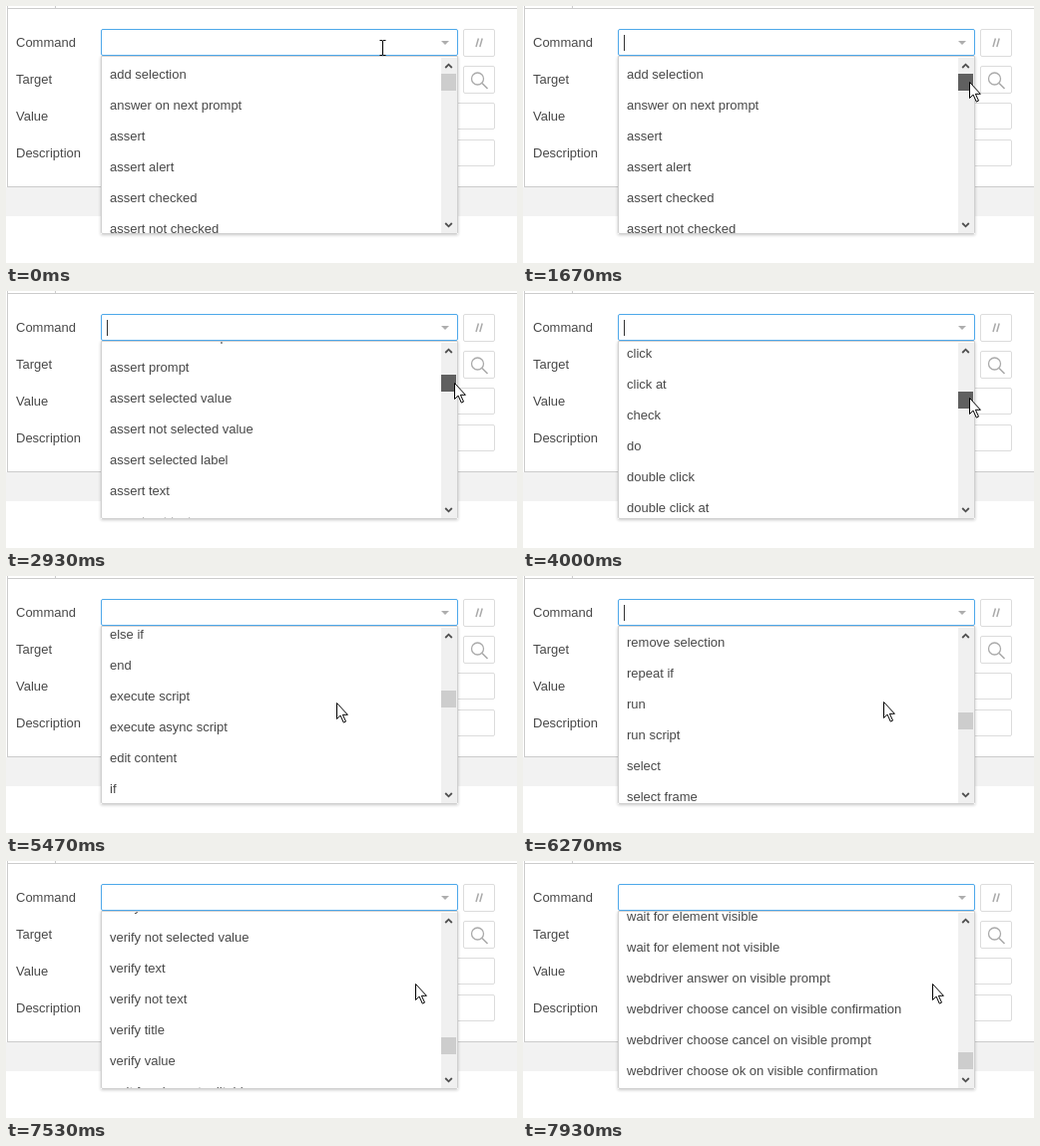
These frames come from a looping animation (512x258 px, 8000 ms). An HTML page:

```html
<!DOCTYPE html>
<html lang="en">
<head>
<meta charset="utf-8">
<title>Command picker</title>
<style>
  html, body { margin: 0; width: 100%; height: 100%; overflow: hidden; background: #fff; }
  #stage { position: relative; width: 512px; height: 258px; overflow: hidden;
    font: 13px/31px "Liberation Sans", Arial, sans-serif; color: #484848; }
  #stage div, #stage svg { position: absolute; box-sizing: border-box; }
  svg { left: 0; top: 0; }
  .panel { left: 1px; top: 2px; width: 520px; height: 180px; border: 1px solid #ccc; }
  .stub { left: 49px; top: 0; width: 1px; height: 2px; background: #ccc; }
  .side { left: 1px; top: 0; width: 1px; height: 3px; background: #ccc; }
  .band { left: 0; top: 182px; width: 512px; height: 29px; background: #f2f2f2; }
  .label { left: 10px; white-space: nowrap; }
  .box { height: 28px; background: #fff; border: 1px solid #dcdcdc; border-radius: 2px; }
  .wide { left: 95px; width: 395px; height: 27px; }
  .small { left: 458px; width: 32px; }
  #field { left: 95px; top: 23px; width: 358px; height: 27px; border-color: #4ea8ea; }
  #menu, #shade { left: 95px; top: 50px; width: 358px; height: 179px; }
  #menu { background: #fff; overflow: hidden; border: 1px solid #d0d0d0; border-radius: 0 0 2px 2px; }
  #shade { box-shadow: 0 1px 3px rgba(0,0,0,.22); }
  #list { left: 8px; top: 2px; white-space: nowrap; }
  #list .row { position: static; }
  #track { left: 436px; top: 52px; width: 16px; height: 176px; background: #f0f0f0; }
  #thumb { left: 436px; top: 68px; width: 15px; height: 17px; }
  #caret { left: 101px; top: 29px; width: 1px; height: 16px; background: #333; }
</style>
</head>
<body>
<div id="stage">
  <div class="panel"></div><div class="side"></div><div class="stub"></div><div class="band"></div>
  <div class="label" style="top:21px">Command</div>
  <div class="label" style="top:58px">Target</div>
  <div class="label" style="top:95px">Value</div>
  <div class="label" style="top:132px">Description</div>
  <div class="box small" style="top:23px"></div>
  <div class="box small" style="top:60px"></div>
  <div class="box wide" style="top:97px"></div>
  <div class="box wide" style="top:134px"></div>
  <div id="shade"></div>
  <div id="menu"><div id="list"></div></div>
  <div id="field" class="box"></div>
  <div id="track"></div>
  <div id="thumb"></div>
  <div id="caret"></div>
  <svg width="512" height="258" fill="none">
    <path d="M436 35h8l-4 4z" fill="#adadad"/>
    <path d="M471 41l2.4-8.5M474.8 41l2.4-8.5" stroke="#aaa" stroke-width="1.5"/>
    <circle cx="472.5" cy="73" r="6" stroke="#aaa" stroke-width="1.3"/>
    <path d="M477 77.5l5.5 5.5" stroke="#aaa" stroke-width="1.6"/>
    <path d="M440.2 62l3.3-3.3 3.3 3.3M440.2 218l3.3 3.3 3.3-3.3" stroke="#505050" stroke-width="1.8"/>
    <path id="beam" d="M-3 -7.5h2.5l.5 .5 .5-.5h2.5M0 -7v14M-3 7.5h2.5l.5-.5 .5 .5h2.5" stroke="#000"/>
    <path id="arrow" d="M.5 .5v16l3.6-3.4 3.2 7 2.2-1-3.1-6.8h5z" fill="#fff" stroke="#000"/>
  </svg>
</div>
<script>
  const commands = `add selection|answer on next prompt|assert|assert alert|assert checked|assert not checked
assert confirmation|assert editable|assert not editable|assert element present|assert element not present
assert prompt|assert selected value|assert not selected value|assert selected label|assert text|assert not text
assert title|assert value|choose cancel on next confirmation|choose cancel on next prompt
choose ok on next confirmation|click|click at|check|do|double click|double click at|drag and drop to object
echo|else|else if|end|execute script|execute async script|edit content|if|mouse down|mouse down at
mouse move at|mouse out|mouse over|mouse up|mouse up at|open|pause|remove selection|repeat if|run|run script
select|select frame|select window|send keys|set speed|store|store attribute|store text|store value|store title
store xpath count|submit|times|type|uncheck|verify|verify checked|verify not checked|verify editable
verify not editable|verify element present|verify element not present|verify selected value
verify not selected value|verify text|verify not text|verify title|verify value|wait for element editable
wait for element not editable|wait for element present|wait for element not present|wait for element visible
wait for element not visible|webdriver answer on visible prompt|webdriver choose cancel on visible confirmation
webdriver choose cancel on visible prompt|webdriver choose ok on visible confirmation
webdriver choose ok on visible prompt|while`.split(/[|\n]/);

  const $ = id => document.getElementById(id);
  const list = $('list'), thumb = $('thumb'), caret = $('caret'), beam = $('beam'), arrow = $('arrow');
  for (const name of commands) {
    const row = document.createElement('div');
    row.className = 'row';
    row.textContent = name;
    list.append(row);
  }

  // Time advances in ticks of 1/15 s.
  const LOOP = 8000, TICK = 200 / 3, SCROLL_PER_THUMB_PX = 20.65;
  const BLINK = 8, ARROW_FROM = 9, HOVER_FROM = 20, DRAG_FROM = 25, DRAG_TO = 62;

  const progress = (tick, from, to) => Math.min(1, Math.max(0, (tick - from) / (to - from)));

  // Two drags of the thumb, then bursts of the wheel.
  function scrollAt(tick) {
    const glide = (from, to, distance) => distance * progress(tick, from, to);
    return glide(DRAG_FROM, 33, 155.7) + glide(36, DRAG_TO, 577)
      + glide(72, 77, 100) + glide(79, 89, 460) + glide(91, 99, 362) + glide(101, 119, 900);
  }

  function pointerAt(tick) {
    let x = 377, y = 42;
    const move = (from, to, toX, toY) => {
      const p = progress(tick, from, to);
      x += (toX - x) * p;
      y += (toY - y) * p;
    };
    move(1, 6, 429, 48);
    move(8, 14, 445, 63);
    move(16, HOVER_FROM, 447, 76);
    move(DRAG_FROM, 44, 449, 92);
    move(44, 60, 447, 107);
    move(61, 65, 331, 127);
    move(91, 99, 410, 123);
    return [Math.round(x), Math.round(y)];
  }

  function draw(now) {
    const tick = Math.floor((now % LOOP + 4) / TICK) % 120;

    const scroll = scrollAt(tick);
    list.style.transform = `translateY(${-Math.round(scroll)}px)`;
    thumb.style.transform = `translateY(${Math.round(scroll / SCROLL_PER_THUMB_PX)}px)`;
    thumb.style.background = tick < HOVER_FROM || tick > DRAG_TO ? '#cdcdcd'
      : tick < DRAG_FROM ? '#a6a6a6' : '#606060';

    const caretOn = tick >= ARROW_FROM && (tick - ARROW_FROM) % (2 * BLINK) < BLINK;
    caret.style.visibility = caretOn ? 'visible' : 'hidden';

    const [x, y] = pointerAt(tick);
    beam.style.display = tick < ARROW_FROM ? '' : 'none';
    arrow.style.display = tick < ARROW_FROM ? 'none' : '';
    beam.setAttribute('transform', `translate(${x + .5} ${y})`);
    arrow.setAttribute('transform', `translate(${x} ${y})`);
  }

  const start = performance.now();
  function loop() {
    draw(performance.now() - start);
    requestAnimationFrame(loop);
  }
  loop();
</script>
</body>
</html>
```
